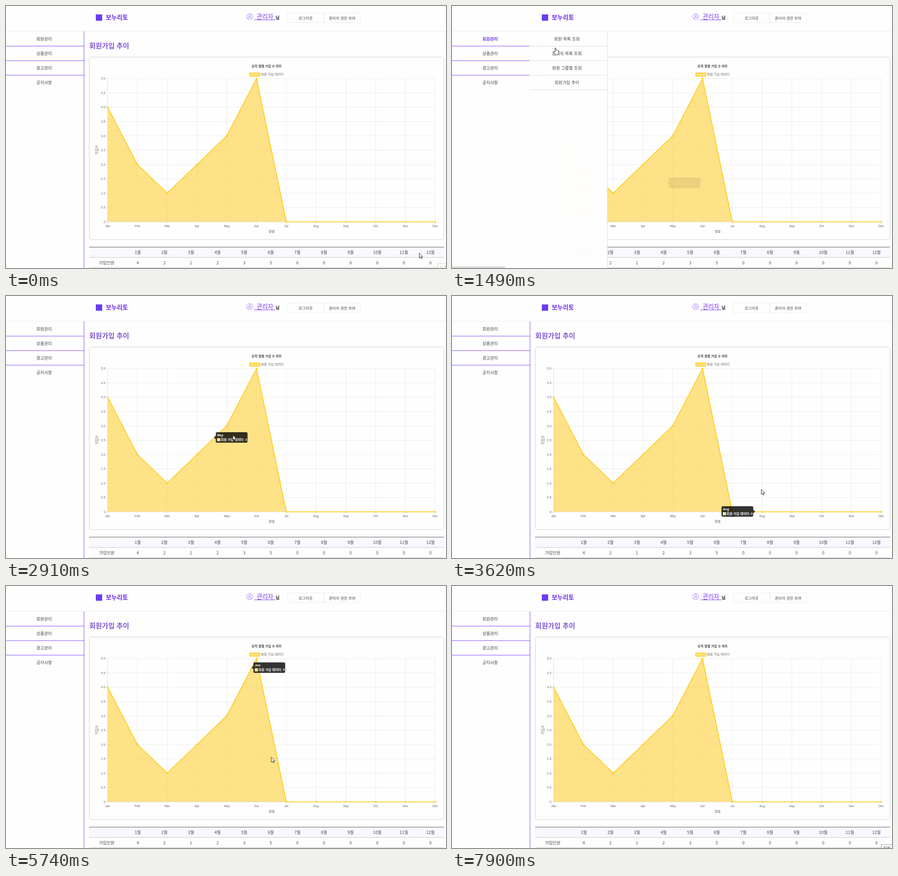
These frames come from a looping animation (970x577 px, 9170 ms). An HTML page:

```html
<!DOCTYPE html>
<html lang="ko">
<head>
<meta charset="utf-8">
<style>
html, body { margin: 0; width: 100%; height: 100%; overflow: hidden; background: #fefefe; }
svg { display: block; width: 970px; height: 577px; }
text { font-family: "Noto Sans CJK KR", "Noto Sans CJK", sans-serif; white-space: pre; }
text.c { font-family: "Liberation Sans", "Noto Sans CJK KR", "Noto Sans CJK", sans-serif; }
</style>
</head>
<body>
<svg id="stage" viewBox="0 0 970 577"></svg>
<script>
const LOOP = 9170;
const NS = 'http://www.w3.org/2000/svg';
const stage = document.getElementById('stage');
const PURPLE = '#8646fb', GOLD = '#ffcc1a', PALE = '#ffe389';
const MONTHS = 'Jan Feb Mar Apr May Jun Jul Aug Sep Oct Nov Dec'.split(' ');
const JOINED = [4, 2, 1, 2, 3, 5];
const data = i => JOINED[i] || 0;
const px = i => 224 + i * 65.66;
const py = v => 475.3 - v * 63.1;
const rowY = i => 72.3 + 32 * i;

function el(tag, attrs, parent = stage) {
  const e = document.createElementNS(NS, tag);
  for (const k in attrs) e.setAttribute(k, attrs[k]);
  parent.appendChild(e);
  return e;
}
const group = (attrs = {}, parent = stage) => el('g', attrs, parent);
const rect = (x, y, width, height, attrs, parent) => el('rect', { x, y, width, height, ...attrs }, parent);
const line = (x1, y1, x2, y2, stroke, parent) => el('line', { x1, y1, x2, y2, stroke }, parent);

// Text placed by its vertical middle.
function text(str, x, mid, size, attrs = {}, parent = stage) {
  const t = el('text', { x, y: mid + size * 0.37, 'font-size': size, 'text-anchor': 'middle', fill: '#444', ...attrs }, parent);
  t.textContent = str;
  return t;
}
const START = { 'text-anchor': 'start' };
const BOLD = { 'font-weight': 700 };
const TICK = { class: 'c', fill: '#666' };

function drawHeader() {
  rect(198, 18.5, 14, 14, { fill: '#6a3df0' });
  text('보누리토', 220, 25, 13.3, { ...START, fill: '#6c2bea', 'font-weight': 900 });
  const icon = group({ fill: 'none', stroke: '#9a70f5', 'stroke-width': 0.9 });
  el('circle', { cx: 537.3, cy: 23.3, r: 6.6 }, icon);
  el('circle', { cx: 537.3, cy: 21.4, r: 2.2 }, icon);
  el('path', { d: 'M533.2 28.2 Q533.6 24.4 537.3 24.2 Q541 24.4 541.4 28.2' }, icon);
  text('관리자', 571, 23, 13.2, { fill: '#7a35f0' });
  line(547, 30.5, 594, 30.5, '#7a35f0');
  text('님', 598.7, 25, 9.6, { ...BOLD, fill: '#222' });
  ['로그아웃', '관리자 권한 부여'].forEach((s, i) => {
    rect(620.5 + 80 * i, 15.5, 80.5, 21, { fill: 'none', stroke: '#ececec' });
    text(s, 660.5 + 80.5 * i, 26.5, 8.35);
  });
  line(0, 55.5, 970, 55.5, '#ececec');
}

function drawChart() {
  text('회원가입 추이', 183.5, 87.5, 15.2, { ...START, ...BOLD, fill: '#7f55d3' });
  rect(183.5, 112.5, 782, 402, { rx: 5, fill: 'none', stroke: '#cfcfcf' });
  text('유저 월별 가입 수 차트', 574.5, 132, 7.1, { ...BOLD, class: 'c' });
  rect(537.5, 147.7, 22, 6.8, { fill: PALE, stroke: GOLD, 'stroke-width': 1.8 });
  text('회원 가입 데이터', 562, 150.5, 7.1, { ...START, ...TICK });
  for (let i = 0; i <= 10; i++) {
    const y = py(i / 2);
    line(220, y, 946.5, y, i ? '#ebebeb' : '#dcdcdc');
    text(i ? (i / 2).toFixed(1) : '0', 219, y, 6.8, { ...TICK, 'text-anchor': 'end' });
  }
  MONTHS.forEach((m, i) => {
    line(px(i), 160, px(i), 479.5, i ? '#ebebeb' : '#dcdcdc');
    text(m, px(i), 484.3, 6.8, TICK);
  });
  const pts = MONTHS.map((m, i) => px(i) + ' ' + py(data(i))).join(' L');
  el('path', { d: `M${pts} L${px(0)} ${py(0)}Z`, fill: '#ffd13a', 'fill-opacity': 0.6 });
  el('path', { d: 'M' + pts, fill: 'none', stroke: GOLD, 'stroke-width': 1.8, 'stroke-linejoin': 'round' });
  MONTHS.forEach((m, i) => el('circle', { cx: px(i), cy: py(data(i)), r: 1.9, fill: GOLD }));
  text('월별', 585.5, 496.5, 7.2, TICK);
  text('가입수', 0, 0, 7.6, { ...TICK, transform: 'translate(200 317) rotate(-90)' });
}

function drawTable() {
  rect(183, 531, 783, 23, { fill: '#f9f7ff' });
  line(183, 531, 966, 531, '#555');
  line(183, 553.8, 966, 553.8, '#c4c4c4');
  line(183, 576.4, 966, 576.4, '#c4c4c4');
  text('가입인원', 222, 565.5, 9.2);
  MONTHS.forEach((m, i) => {
    const x = 290.5 + i * 58.66;
    text(i + 1 + '월', x, 543, 9.2);
    text(data(i), x, 565.5, 8.8);
  });
}

drawHeader();
drawChart();
drawTable();

line(172, 56, 172, 577, PURPLE);
const sideLabels = ['회원관리', '상품관리', '광고관리', '공지사항'].map((s, i) => {
  if (i < 3) line(0, 88.3 + 32 * i, 172, 88.3 + 32 * i, PURPLE);
  return text(s, 84, rowY(i), 9.3);
});

// Chart tooltip and the faint box it leaves behind
const remnant = group({ fill: '#000', opacity: 0.07 });
rect(478, 378, 70, 23.5, { rx: 3 }, remnant);
el('path', { d: 'M478 386 L475 390 L478 394Z' }, remnant);
const tip = group();
const caret = el('path', { 'fill-opacity': 0.8 }, tip);
rect(0, 0, 70, 23, { rx: 3, fill: '#000', 'fill-opacity': 0.8 }, tip);
const TIP_TEXT = { ...START, ...BOLD, class: 'c', fill: '#fff' };
const tipTitle = text('', 3, 6.5, 7, TIP_TEXT, tip);
rect(3.5, 13.5, 6, 6, { fill: PALE, stroke: '#fff', 'stroke-width': 0.8 }, tip);
const tipBody = text('', 11, 16, 7.1, TIP_TEXT, tip);

// Slide-out submenu, hidden behind the sidebar
const clip = el('clipPath', { id: 'side' }, el('defs', {}));
rect(171, 56, 300, 521, {}, clip);
const panel = group({}, group({ 'clip-path': 'url(#side)' }));
rect(171, 56, 171.5, 521, { fill: '#fefefe' }, panel);
const hover = rect(172, 56, 170, 32, { fill: '#f6f1ff' }, panel);
line(342.4, 56, 342.4, 577, '#dedede', panel);
['회원 목록 조회', '관리자 목록 조회', '회원 그룹별 조회', '회원가입 추이'].forEach((s, i) => {
  text(s, 253.3, rowY(i), 9.35, {}, panel);
  line(172, 88.4 + 32 * i, 342, 88.4 + 32 * i, '#dcdcdc', panel);
});

const status = rect(0, 573.6, 117, 4, { fill: '#d6d6d6' });

function hint(x, y, str, edge, ink) {
  const g = group();
  rect(x, y, 40, 20, { fill: '#fff', stroke: edge }, g);
  text(str, x + 4, y + 8.5, 8.8, { ...START, fill: ink }, g);
  return g;
}
const hintOld = hint(952.5, 567.5, '노츠', '#d0d0d0', '#aaa');
const hintNew = hint(946.5, 569.5, '직전', '#999', '#444');

const pointer = group({ fill: '#fff', stroke: '#111', 'stroke-width': 0.9, 'stroke-linejoin': 'round' });
const arrow = el('path', { d: 'M0 0 V11 L2.6 8.7 L4.3 12.5 L6 11.7 L4.3 8 H7.7Z' }, pointer);
const hand = el('path', { d: 'M-1 1 Q0 -1 1.2 1 V5.2 L2.2 4.4 L3.6 5.4 L4.6 4.8 L5.8 6 Q7 6 7 7.6 V11 L5.6 13 V15.2 H-1.6 V13.4 L-5 9.2 Q-5 7.4 -3 8 L-1 9.6Z' }, pointer);

const ENTER = 840, CLICK = 2240, CLOSED = 2750, LEAVE = 7160;
const ramp = (t, a, b) => Math.max(0, Math.min(1, (t - a) / (b - a)));
const mix = (a, b, k) => a + (b - a) * k;

// Turning points of the pointer: time, x, y
const PATH = [
  [90, 911, 544], [720, 130, 48], [900, 112, 70], [1490, 228, 92], [1900, 278, 168],
  [2450, 278, 169], [2950, 519, 318], [3500, 651, 418], [3620, 682, 426], [4080, 664, 420],
  [4430, 255, 341], [4880, 253, 339], [5582, 519, 376], [5740, 585, 377], [5830, 585, 379],
  [6010, 642, 443], [6700, 900, 560], [LEAVE, 918, 579]
];

function pointerAt(t) {
  const i = Math.max(1, PATH.findIndex(p => p[0] >= t));
  const [t0, x0, y0] = PATH[i - 1], [t1, x1, y1] = PATH[i];
  const k = ramp(t, t0, t1);
  return [mix(x0, x1, k), mix(y0, y1, k)];
}

const shutAt = t => t < CLICK ? 1 - ramp(t, 900, 1350) : ramp(t, CLICK, CLOSED);

// Month nearest to the pointer, or -1 away from the chart
function monthAt(t) {
  const [x, y] = pointerAt(t);
  const covered = t > 900 && t < CLOSED && x < 347 - 170 * shutAt(t);
  if (covered || x < 184 || x > 966 || y < 112 || y > 514) return -1;
  return Math.max(0, Math.min(11, Math.round((x - 224) / 65.66)));
}

const visits = [];
for (let t = 0, last = -1; t < LEAVE; t += 10) {
  const month = monthAt(t);
  if (month !== last) visits.push([t, month]);
  last = month;
}

function goal(month, from) {
  if (month < 0) return { ...from, a: 0 };
  const left = month < 6;
  return { month, left, x: px(month) + (left ? 4 : -74), y: py(data(month)), a: 1 };
}

// Each visit eases on from wherever the one before it had got to.
function tipAt(t) {
  let s = { ...goal(8), a: 0 };
  visits.forEach(([from, month], i) => {
    if (from > t) return;
    const end = i + 1 < visits.length ? Math.min(t, visits[i + 1][0]) : t;
    const k = 1 - (1 - ramp(end, from, from + 400)) ** 4;
    const g = goal(month, s);
    s = { ...g, x: mix(s.x, g.x, k), y: mix(s.y, g.y, k), a: mix(s.a, g.a, k) };
  });
  return s;
}

const show = (e, on) => e.setAttribute('visibility', on ? 'visible' : 'hidden');
const move = (e, x, y) => e.setAttribute('transform', `translate(${x.toFixed(2)} ${y.toFixed(2)})`);

function render(t) {
  const [x, y] = pointerAt(Math.min(t, LEAVE));
  const onMenu = t > ENTER && t < CLICK;
  move(pointer, x, y);
  show(pointer, t < LEAVE);
  arrow.style.display = onMenu ? 'none' : '';
  hand.style.display = onMenu ? '' : 'none';

  const active = t > ENTER && t < CLOSED;
  sideLabels[0].setAttribute('fill', active ? '#7a2ff5' : '#444');
  sideLabels[0].setAttribute('font-weight', active ? 700 : 400);

  const shut = shutAt(t);
  move(panel, -170 * shut, 0);
  panel.setAttribute('opacity', 0.985 * (1 - shut) ** 2);
  hover.setAttribute('y', 56 + 32 * Math.max(0, Math.min(3, Math.floor((y - 56) / 32))));
  show(hover, t > 1560);

  status.setAttribute('width', t < 1800 ? 117 : 144);
  show(status, t > 1050 && t < CLOSED);

  const s = tipAt(t);
  move(tip, s.x, s.y - 11.5);
  tip.setAttribute('opacity', s.a);
  caret.setAttribute('d', s.left ? 'M0 7.5 L-4 11.5 L0 15.5Z' : 'M70 7.5 L74 11.5 L70 15.5Z');
  tipTitle.textContent = MONTHS[s.month];
  tipBody.textContent = '회원 가입 데이터: ' + data(s.month);
  show(remnant, t > 600 && t < 2600);

  hintOld.setAttribute('opacity', 1 - ramp(t, 60, 200));
  hintNew.setAttribute('opacity', ramp(t, 7700, 7900));
}

function tick() {
  render(performance.now() % LOOP);
  requestAnimationFrame(tick);
}
tick();
</script>
</body>
</html>
```
